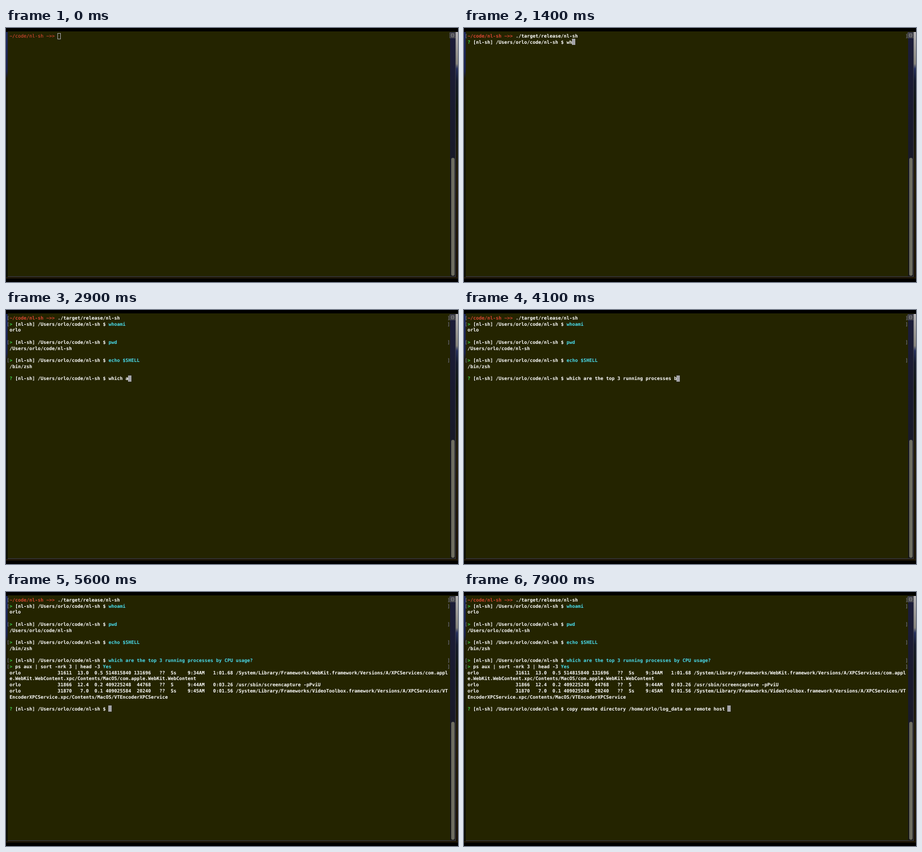
Animation, 800 px wide and 450 px high, one loop 8000 ms. Source, as an HTML page:

```html
<!DOCTYPE html>
<html lang="en">
<head>
<meta charset="utf-8">
<title>Terminal session</title>
<style>
html, body { margin: 0; width: 100%; height: 100%; overflow: hidden; background: #000; }
#stage { position: relative; width: 800px; height: 450px; overflow: hidden; background: #000; }
#stage svg { position: absolute; left: 0; top: 0; }
.row, .mark, #cursor { position: absolute; height: 10.72px; line-height: 10.72px; }
.row, .mark {
  font: 700 8.32px/10.72px "DejaVu Sans Mono", "Noto Sans Mono", monospace;
  font-variant-ligatures: none; white-space: pre; color: #fff;
  text-rendering: geometricPrecision;
}
.row { left: 6.3px; }
.mark { font-weight: 400; color: #8484a4; }
.red { color: #dc4632; }
.idle { font-weight: 400; color: #f04c38; }
.green { color: #3fd44c; }
.cyan { color: #4adcec; }
#cursor { width: 6px; height: 11px; box-sizing: border-box; background: #a3a3a8; }
#cursor.hollow { background: none; border: 1px solid #a3a3a8; }
</style>
</head>
<body>
<div id="stage">
  <svg width="800" height="450" viewBox="0 0 800 450">
    <defs>
      <linearGradient id="left" x2="0" y2="1">
        <stop offset="0" stop-color="#1c2860"/><stop offset=".16" stop-color="#18204a"/>
        <stop offset=".19" stop-color="#1c1a06"/><stop offset=".5" stop-color="#141606"/>
        <stop offset="1" stop-color="#0c0e04"/>
      </linearGradient>
      <linearGradient id="right" x2="0" y2="1">
        <stop offset="0" stop-color="#b4b2b4"/><stop offset=".13" stop-color="#85837c"/>
        <stop offset=".15" stop-color="#26305c"/><stop offset=".2" stop-color="#141a2c"/>
        <stop offset=".3" stop-color="#10160c"/><stop offset=".6" stop-color="#231b08"/>
        <stop offset="1" stop-color="#1a1206"/>
      </linearGradient>
      <linearGradient id="track" x2="0" y2="1">
        <stop offset="0" stop-color="#1c1d3a"/><stop offset=".4" stop-color="#191a2c"/>
        <stop offset="1" stop-color="#181816"/>
      </linearGradient>
    </defs>
    <path fill="#1e1606" d="M0 440h800v4H0z"/>
    <path fill="url(#left)" d="M0 7h4v434H0z"/>
    <path fill="url(#right)" d="M796 7h4v434h-4z"/>
    <path fill="#242400" d="M3 6h793v434H3z"/>
    <path fill="url(#track)" d="M786 7h9v433h-9z"/>
    <path fill="none" stroke="#3a3b48" d="M3 440.5h793M795.5 7v433"/>
    <rect x="788" y="230" width="6" height="209" rx="3" fill="#6e6d60"/>
    <rect x="785.5" y="8.5" width="10" height="9" fill="#34343c" stroke="#55555c"/>
    <path fill="none" stroke="#a2a2a2" stroke-width=".8" d="M788 10.5h5v5h-5zM788 13h5"/>
  </svg>
  <div id="screen"></div>
  <div id="cursor"></div>
</div>
<script>
const LOOP = 8000, TICK = 100, LEFT = 6.3, TOP = 9, CELL = 5, LINE = 10.72;
const USER = 'orlo';
const HOME = `[nl-sh] /Users/${USER}/code/nl-sh $ `;
const LIB = '/System/Library/Frameworks/';

// Columns as printed by ps
const ps = (pid, cpu, mem, vsz, rss, stat, start, time, cmd) =>
  USER.padEnd(17) + pid + cpu.padStart(6) + mem.padStart(5) + ' ' + vsz + rss.padStart(7) +
  '   ??  ' + stat.padEnd(6) + start + time.padStart(10) + ' ' + cmd;

// at: prompt appears, keys: [tick, characters typed], enter: submitted; ticks of 100 ms
const steps = [
  { row: 0, at: 0, shell: true, prompt: '~/code/nl-sh ~>> ', text: './target/release/nl-sh',
    keys: [[0, 0], [7, 11], [11, 22]], enter: 12 },
  { row: 1, at: 13, prompt: HOME, text: 'whoami', keys: [[13, 0], [17, 6]], enter: 18, out: [USER] },
  { row: 4, at: 19, prompt: HOME, text: 'pwd', keys: [[20, 0], [21, 3]], enter: 22,
    out: [`/Users/${USER}/code/nl-sh`] },
  { row: 7, at: 22, prompt: HOME, text: 'echo $SHELL', keys: [[22, 0], [26, 11]], enter: 27,
    out: ['/bin/zsh'] },
  { row: 10, at: 27, prompt: HOME, text: 'which are the top 3 running processes by CPU usage?',
    keys: [[27, 0], [30, 10], [31, 10], [41, 39], [45, 51]], enter: 46 },
  { row: 11, at: 50, prompt: 'ps aux | sort -nrk 3 | head -3 ', text: 'y', answer: 'Yes',
    keys: [[52, 0], [53, 1]], enter: 56, out: [
      ps('31611', '13.0', '0.5', '514815840', '131696', 'Ss', '9:34AM', '1:01.68',
        LIB + 'WebKit.framework/Versions/A/XPCServices/com.appl'),
      'e.WebKit.WebContent.xpc/Contents/MacOS/com.apple.WebKit.WebContent',
      ps('31866', '12.4', '0.2', '409225248', '44768', 'S', '9:44AM', '0:03.26',
        '/usr/sbin/screencapture -pPviU'),
      ps('31870', '7.0', '0.1', '409025584', '20240', 'Ss', '9:45AM', '0:01.56',
        LIB + 'VideoToolbox.framework/Versions/A/XPCServices/VT'),
      'EncoderXPCService.xpc/Contents/MacOS/VTEncoderXPCService'] },
  { row: 18, at: 56, prompt: HOME, text: `copy remote directory /home/${USER}/log_data on remote host `,
    keys: [[57, 0], [65, 17], [79, 57]], enter: Infinity }
];

const screen = document.getElementById('screen');
const cursor = document.getElementById('cursor');

function typed(keys, k) {
  for (let i = keys.length - 1; i >= 0; i--) {
    const [a, n] = keys[i];
    if (k < a) continue;
    const next = keys[i + 1];
    return next ? Math.round(n + (next[1] - n) * (k - a) / (next[0] - a)) : n;
  }
  return 0;
}

const esc = s => s.replace(/&/g, '&amp;').replace(/</g, '&lt;').replace(/>/g, '&gt;');
const span = (cls, s) => `<span class="${cls}">${esc(s)}</span>`;
const y = row => (TOP + row * LINE).toFixed(2);
const line = (row, html) => `<div class="row" style="top:${y(row)}px">${html}</div>`;
const mark = (row, x, s) => `<div class="mark" style="left:${x}px;top:${y(row)}px">${s}</div>`;

function draw(k) {
  let html = '', row = 0, col = 0;
  for (const s of steps) {
    if (k < s.at) break;
    const done = k >= s.enter;
    const text = done ? s.answer || s.text : s.text.slice(0, typed(s.keys, k));
    const head = s.shell
      ? span(k ? 'red' : 'red idle', s.prompt)
      : span('green', done ? '> ' : '? ') + esc(s.prompt);
    html += line(s.row, head + span(done && !s.shell ? 'cyan' : '', text));
    if (done || (s.shell && k)) html += mark(s.row, 1.3, '[') + mark(s.row, 781, ']');
    const out = done && s.out || [];
    out.forEach((o, i) => html += line(s.row + 1 + i, esc(o)));
    row = done ? s.row + 1 + out.length : s.row;
    col = done ? 0 : s.prompt.length + (s.shell ? 0 : 2) + text.length;
  }
  screen.innerHTML = html;
  cursor.className = k ? '' : 'hollow';
  cursor.style.left = Math.floor(LEFT + col * CELL) + 'px';
  cursor.style.top = Math.floor(y(row)) + 'px';
}

let last = -1;
const start = performance.now();
function frame() {
  const k = Math.floor((performance.now() - start) % LOOP / TICK);
  if (k !== last) draw(last = k);
  requestAnimationFrame(frame);
}
frame();
</script>
</body>
</html>
```
